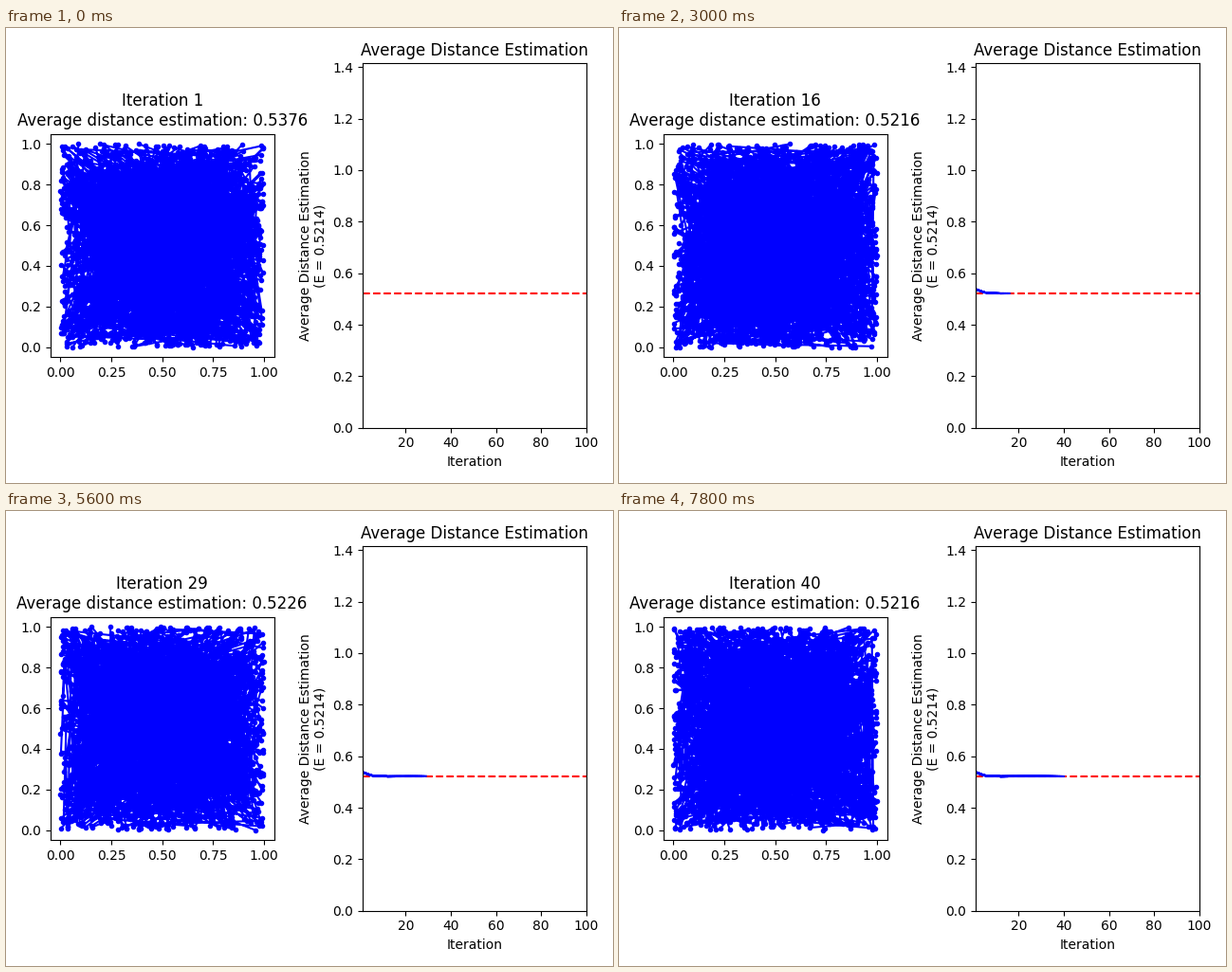
A matplotlib script that plays this animation: 640 px wide and 480 px high, repeating every 8 s.

```python
import numpy as np
import matplotlib.pyplot as plt
from matplotlib.animation import FuncAnimation

W, H, DPI = 640, 480, 100
FRAMES, STEP_MS = 40, 200
PAIRS = 1000
EXPECTED = 0.5214

plt.rcParams["font.family"] = "DejaVu Sans"

# Running mean of the distance, eased between a few key iterations
KEYS = [(1, 0.5376), (5, 0.5252), (7, 0.5239), (12, 0.5214),
        (19, 0.5217), (29, 0.5226), (36, 0.5220), (40, 0.5216)]
iters = np.arange(1, FRAMES + 1)
means = np.interp(iters, *zip(*KEYS))


def random_pairs(i):
    """Segments between random points, separated by NaN gaps."""
    rng = np.random.default_rng(100 + i)
    xy = np.full((PAIRS, 3, 2), np.nan)
    xy[:, :2] = rng.random((PAIRS, 2, 2))
    return xy.reshape(-1, 2).T


fig, (square, chart) = plt.subplots(1, 2, figsize=(W / DPI, H / DPI), dpi=DPI,
                                    facecolor="white")
square.set_aspect("equal")
chart.set(xlim=(1, 100), ylim=(0, np.sqrt(2)),
          title="Average Distance Estimation", xlabel="Iteration",
          ylabel=f"Average Distance Estimation\n(E = {EXPECTED})")
chart.axhline(EXPECTED, color="r", linestyle="--")
# The layout is settled while the square still has its default 0..1 ticks
fig.tight_layout()

segments, = square.plot([], [], "b.-")
margin = 0.0495
square.set(xlim=(-margin, 1 + margin), ylim=(-margin, 1 + margin),
           xticks=np.linspace(0, 1, 5), yticks=np.linspace(0, 1, 6))

# Each iteration lays one more line over the earlier ones
history = [chart.plot(iters[:n], means[:n], "b-")[0] for n in iters]


def update(i):
    segments.set_data(*random_pairs(i))
    for n, line in enumerate(history):
        line.set_visible(n <= i)
    square.set_title(f"Iteration {i + 1}\n"
                     f"Average distance estimation: {means[i]:.4f}")
    return [segments, *history]


anim = FuncAnimation(fig, update, frames=FRAMES, interval=STEP_MS,
                     repeat=True, repeat_delay=0)
plt.show()
```
